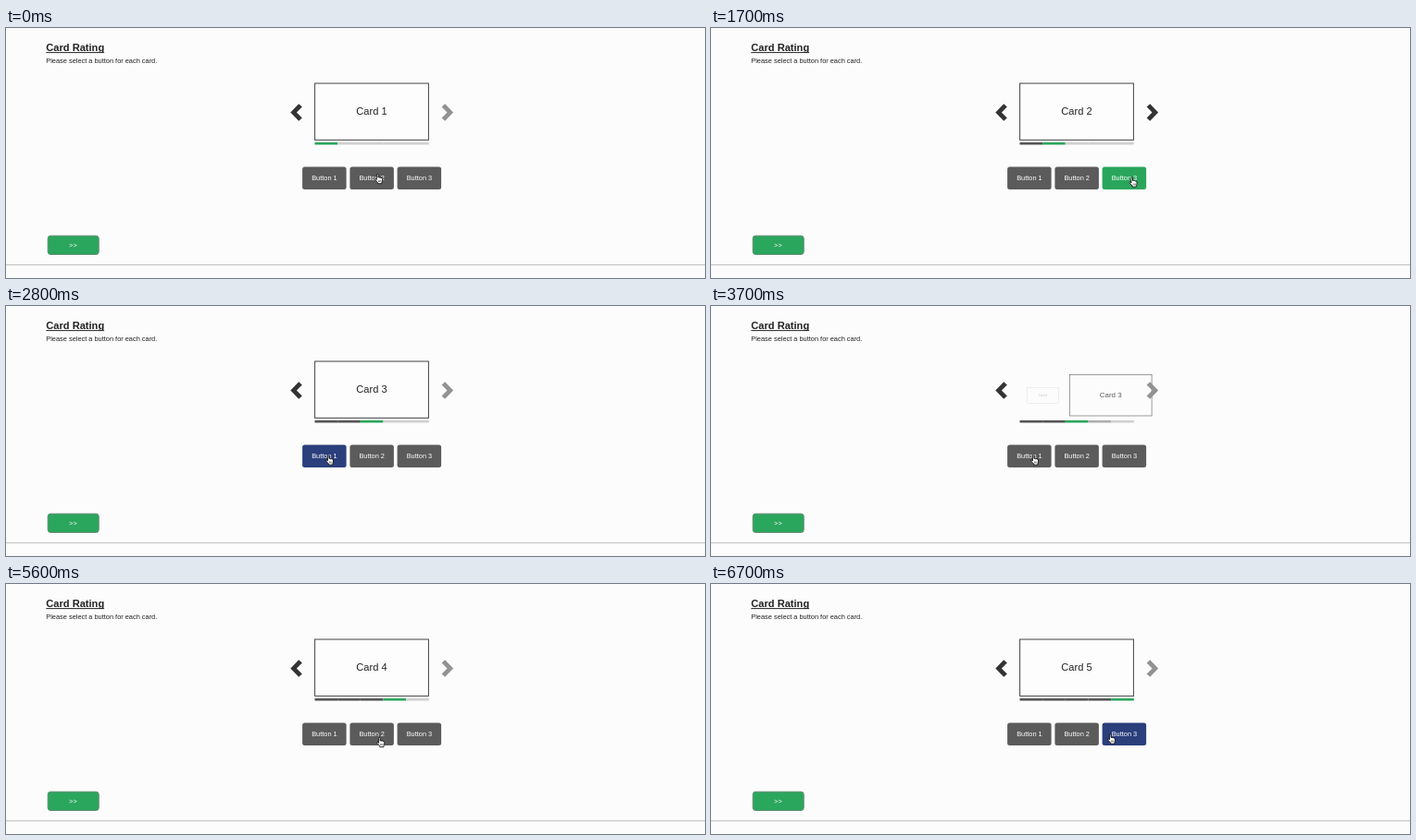
These frames come from a looping animation (755x271 px, 6.8 s). An HTML page:

```html
<!DOCTYPE html>
<html lang="en">
<head>
<meta charset="utf-8">
<title>Card Rating</title>
<style>
  html, body { margin: 0; width: 100%; height: 100%; overflow: hidden; background: #fcfcfc; }
  svg { display: block; width: 100%; height: 100%; }
  text { font-family: "Liberation Sans", Arial, sans-serif; fill: #222; }
  .mid { text-anchor: middle; }
  .label { font-size: 7.4px; fill: #fff; text-anchor: middle; }
</style>
</head>
<body>
<svg id="stage" viewBox="0 0 755 271">
  <rect width="755" height="271" fill="#fcfcfc"/>
  <rect y="256" width="755" height="1.4" fill="#cbcbcb"/>
  <text x="43.3" y="25" font-size="11.1" font-weight="bold">Card Rating</text>
  <rect x="43.3" y="26.1" width="62.8" height="1" fill="#222"/>
  <text x="43.3" y="37.7" font-size="7.4">Please select a button for each card.</text>
  <g id="cards"></g>
  <g id="bar"></g>
  <path d="M307.3 91.5 316.2 82.2 319.8 85.6 313.9 91.5 319.8 97.4 316.2 100.8Z" fill="#333"/>
  <path id="next" d="M483.1 91.5 474.2 82.2 470.6 85.6 476.5 91.5 470.6 97.4 474.2 100.8Z"/>
  <g id="buttons"></g>
  <rect x="45.2" y="225.2" width="55" height="20.3" rx="3" fill="#2ba65d" stroke="#5d8a70"/>
  <text class="label" x="72.4" y="237.6">&gt;&gt;</text>
  <g id="hand" stroke="#111" stroke-width=".9" stroke-linejoin="round">
    <path fill="#fff" d="M2.4 6.4V1.3Q2.4 .4 3.2 .4T4 1.3V4Q4.8 3.4 5.5 4.2 6.3 3.7 7 4.5 8.5 4 8.5 5.5V7.6Q8.5 8.8 7.8 9.6V10.7H3.6V9.7L.6 6.4Q.2 5.6 1 5.4 1.7 5.3 2.4 6.4Z"/>
    <path fill="none" stroke-width=".5" d="M4.5 7V9M5.7 7V9M6.9 7V9"/>
  </g>
</svg>
<script>
const LOOP = 6800, STEP = 100, SLIDE = 595;
const GRAY = '#5b5b5b', GREEN = '#2aa65c', BLUE = '#2a3f7b';
const slides = [0, 1701, 3490, 5600];   // start of each card swap
const clicks = [null, { at: 1201, button: 2 }, { at: 3005, button: 0 }, { at: 5100, button: 1 }];
const buttonX = [320.1, 371.4, 422.6];

// time, x, y of the pointer's centre
const route = [
  [0, 402.5, 163.5], [700, 402.5, 163.5], [1150, 461, 164], [1400, 461, 164],
  [1500, 456, 167], [2300, 456, 167], [2700, 349.5, 167], [4300, 349.5, 167],
  [4600, 416.5, 162], [4700, 417, 162], [4900, 404.7, 171.5], [6200, 404.7, 171.5],
  [6400, 453.5, 167], [6500, 432.5, 168], [LOOP, 432.5, 168]
];

const $ = id => document.getElementById(id);

function add(parent, tag, attrs, text) {
  const el = document.createElementNS('http://www.w3.org/2000/svg', tag);
  for (const k in attrs) el.setAttribute(k, attrs[k]);
  if (text) el.textContent = text;
  return parent.appendChild(el);
}

const swing = u => 0.5 - Math.cos(Math.PI * u) / 2;

const cards = [1, 2, 3, 4, 5].map(n => {
  const g = add($('cards'), 'g', {});
  add(g, 'rect', { x: -61.4, y: -30.7, width: 122.8, height: 61.4, fill: '#fdfdfd', stroke: '#444' });
  add(g, 'text', { class: 'mid', y: 3.6, 'font-size': 11.1 }, 'Card ' + n);
  return g;
});

const segments = cards.map((_, i) =>
  add($('bar'), 'rect', { x: 333.5 + i * 24.66, y: 123.9, width: 24.66, height: 2.6 }));

const buttons = buttonX.map((x, i) => {
  const box = add($('buttons'), 'rect', { x, y: 150.6, width: 47.5, height: 24.4, rx: 2.5 });
  add($('buttons'), 'text', { class: 'label', x: x + 23.8, y: 165.1 }, 'Button ' + (i + 1));
  return box;
});

function pointer(t) {
  const i = Math.max(1, route.findIndex(r => r[0] > t));
  const [t0, x0, y0] = route[i - 1], [t1, x1, y1] = route[i];
  const u = swing((t - t0) / (t1 - t0));
  return [x0 + (x1 - x0) * u, y0 + (y1 - y0) * u];
}

function mixGray(from, to, u) {
  const v = Math.round(from + (to - from) * u);
  return `rgb(${v},${v},${v})`;
}

function placeCard(card, scale, dx, dy) {
  card.setAttribute('display', scale > 0.01 ? 'inline' : 'none');
  card.setAttribute('opacity', scale);
  card.setAttribute('transform', `translate(${395 + dx} ${90.7 + dy}) scale(${scale})`);
}

function draw(t) {
  const turn = slides.filter(s => s <= t).length - 1;
  const u = Math.min(1, (t - slides[turn]) / SLIDE);
  const p = swing(u), moving = u < 1;
  const current = moving ? turn : turn + 1;
  const [x, y] = pointer(t);

  // the two cards swing apart and trade places
  const arc = Math.sin(Math.PI * p);
  cards.forEach((card, i) => {
    if (i === turn) placeCard(card, 1 - p, 48 * arc, 8 * arc);
    else if (i === turn + 1) placeCard(card, p, -48 * arc, 8 * arc);
    else placeCard(card, 0, 0, 0);
  });

  segments.forEach((seg, i) => {
    const fade = moving && i === turn + 1 ? p : 0;
    seg.setAttribute('fill', i < current ? '#555' : i === current ? GREEN : mixGray(208, 85, fade));
  });

  const click = clicks[turn + 1];
  const chosen = click && t >= click.at ? click.button : -1;
  const over = (bx, px, py) => px >= bx && px <= bx + 47.5 && py >= 150.6 && py <= 175;
  buttons.forEach((box, i) => {
    const hover = !moving && over(buttonX[i], x - 1, y - 5);
    box.setAttribute('fill', i === chosen ? GREEN : hover ? BLUE : GRAY);
  });
  $('next').setAttribute('fill', chosen >= 0 ? '#333' : '#929292');
  $('hand').setAttribute('transform', `translate(${x - 4.5} ${y - 5.5})`);
}

const start = performance.now();
function tick() {
  const t = (performance.now() - start) % LOOP;
  draw(Math.floor(t / STEP) * STEP);
  requestAnimationFrame(tick);
}
tick();
</script>
</body>
</html>
```
